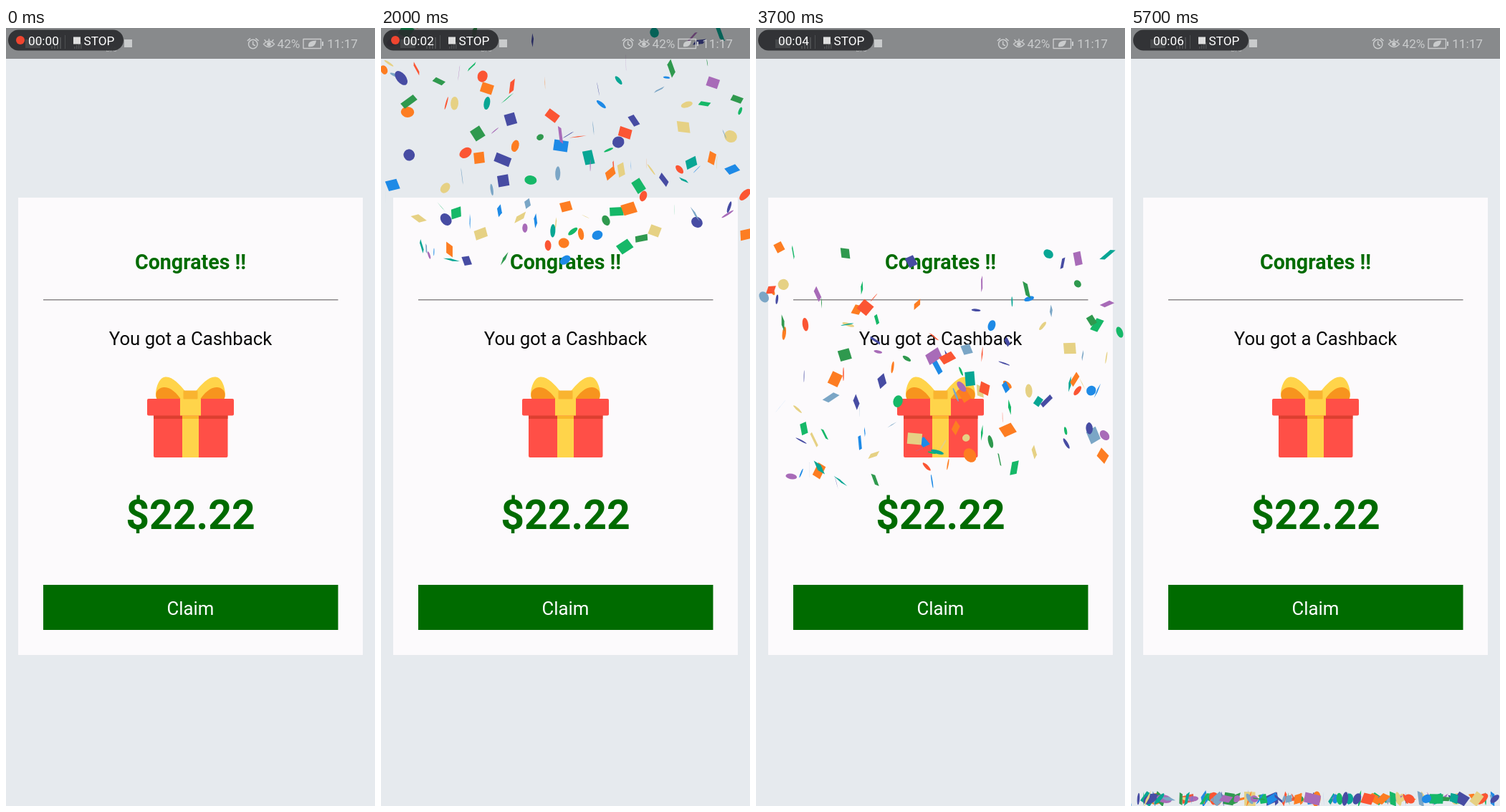
Animation of 515x1087 px, one loop 5.8 s. Source, as an HTML page with a canvas:

```html
<!DOCTYPE html>
<html lang="en">
<head>
<meta charset="utf-8">
<title>Cashback</title>
<style>
  html, body { margin: 0; width: 100%; height: 100%; overflow: hidden; background: #e6eaee; }
  canvas { display: block; width: 515px; height: 1087px; }
</style>
</head>
<body>
<canvas id="stage" width="515" height="1087"></canvas>
<script>
const ctx = document.getElementById('stage').getContext('2d');
const W = 515, H = 1087, LOOP = 5800, STEP = 100;
const GREEN = '#006b00', FAINT = '#c9cbcc';
const BURST_START = 1.15, BURST_TIME = 0.43, FALL_START = BURST_START + BURST_TIME;
const FLOOR = 1077, ORIGIN_X = -10;
const COLORS = ['#fd7d22', '#16b868', '#1e8ae6', '#7ba6c6', '#e6d184',
                '#fb5533', '#2f994e', '#474ca3', '#a86bb8', '#08a694'];

// Large pieces at full spread: x, y, colour, round
const LANDMARKS = [
  [488, 149, 4, 1], [39, 175, 7, 1], [105, 256, 1, 0], [91, 265, 7, 1], [171, 211, 7, 0],
  [16, 217, 2, 0], [255, 298, 0, 1], [302, 287, 2, 1], [340, 303, 1, 0], [510, 286, 0, 0],
  [251, 162, 2, 0], [135, 145, 6, 0], [181, 125, 7, 0], [341, 144, 5, 0], [433, 186, 9, 0],
  [422, 136, 4, 0], [441, 269, 7, 1], [90, 221, 4, 1], [37, 115, 0, 1], [118, 172, 5, 1],
  [148, 82, 0, 0], [239, 120, 5, 0], [209, 210, 1, 1], [139, 285, 4, 0], [258, 247, 0, 0],
  [329, 254, 1, 0], [346, 250, 0, 0], [382, 281, 4, 0], [331, 157, 7, 1], [463, 74, 8, 0]
];

let seed = 20;
function random(min = 0, max = 1) {
  seed = (seed * 1664525 + 1013904223) % 4294967296;
  return min + (max - min) * seed / 4294967296;
}

function makePiece(x, y, color, round, tilt) {
  const spin = () => ({ phase: random(-tilt, tilt), rate: random(-18, 18) });
  return {
    x, y, round, color: COLORS[color],
    w: random(12, 23), h: random(9, 17), swing: random(-34, 34),
    rx: spin(), ry: spin(), rz: spin()
  };
}

const pieces = LANDMARKS.map(([x, y, color, round]) => {
  const piece = makePiece(x, y, color, round, 0.6);
  piece.w = random(15, 20);
  piece.h = random(13, 17);
  return piece;
});
for (let i = 0; i < 100; i++) {
  const x = 4 + 508 * (i * 0.618034 % 1);
  pieces.push(makePiece(x, random(-6, 326), i % 10, random() < 0.5, Math.PI));
}

function rect(x, y, w, h, color, radius = 0) {
  ctx.fillStyle = color;
  ctx.beginPath();
  ctx.roundRect(x, y, w, h, radius);
  ctx.fill();
}

function disc(x, y, r, color) {
  ctx.fillStyle = color;
  ctx.beginPath();
  ctx.arc(x, y, r, 0, Math.PI * 2);
  ctx.fill();
}

function text(str, x, y, size, color, { weight = 400, align = 'center' } = {}) {
  ctx.font = `${weight} ${size}px Roboto, sans-serif`;
  ctx.textAlign = align;
  ctx.fillStyle = color;
  ctx.fillText(str, x, y);
}

function shape(path, color) {
  ctx.fillStyle = color;
  ctx.fill(new Path2D(path));
}

function line(path, color, width) {
  ctx.strokeStyle = color;
  ctx.lineWidth = width;
  ctx.stroke(new Path2D(path));
}

function drawGift() {
  rect(206, 535, 103.5, 65, '#ff4f47', 2);
  rect(206, 541, 103.5, 5, '#dd3f30');
  rect(246, 541, 23, 59, '#ffd44a');
  rect(246, 541, 23, 5, '#f9b72c');
  for (const side of [1, -1]) {
    ctx.save();
    ctx.translate(257.5, 0);
    ctx.scale(side, 1);
    shape('M-48 516 C-50 503 -43 489 -37 488 C-27 485 -16 497 -7 508 L-7 518 L-47 518 Z', '#ffd44a');
    shape('M-47 518 C-51 508 -44 502 -36 502 C-27 502 -19 511 -14 518 Z', '#f7941e');
    ctx.restore();
  }
  rect(197, 518, 121, 23.5, '#ff4f47', 2);
  rect(243, 518, 29, 23.5, '#ffd44a');
  rect(247.5, 506.5, 20, 12, '#f9b430', 1);
}

function drawCard() {
  rect(0, 0, W, H, '#e6eaee');
  rect(17, 237, 481, 639, '#fcfafc');
  text('Congrates !!', 257.5, 336.5, 28.6, GREEN, { weight: 700 });
  rect(52, 379, 411.5, 1.5, '#8b878a');
  text('You got a Cashback', 257.5, 442.5, 25.75, '#080808');
  drawGift();
  text('$22.22', 257.5, 699.5, 57.2, GREEN, { weight: 700 });
  rect(52, 778, 411.5, 63, GREEN);
  text('Claim', 257.5, 819.5, 25.75, '#fff');
}

function drawPiece(p, spread, drop, value) {
  const angle = ({ phase, rate }) => phase + rate * (value - 1);
  const a = angle(p.rx), b = angle(p.ry), c = angle(p.rz);
  const { sin, cos } = Math;
  const sway = value > 1 ? p.swing * sin(Math.PI * (value - 1) / 0.66) : 0;
  const x = ORIGIN_X + (p.x - ORIGIN_X) * spread + sway;
  const y = Math.min(FLOOR, FLOOR - (FLOOR - p.y) * spread + drop);
  ctx.save();
  // Flat projection of a turn about all three axes
  ctx.transform(
    cos(b) * cos(c), sin(c) * cos(a) + sin(b) * cos(c) * sin(a),
    -cos(b) * sin(c), cos(c) * cos(a) - sin(b) * sin(c) * sin(a), x, y);
  ctx.setTransform(ctx.getTransform());
  ctx.fillStyle = p.color;
  ctx.beginPath();
  if (p.round) ctx.ellipse(0, 0, p.w / 2, p.h / 2, 0, 0, Math.PI * 2);
  else ctx.rect(-p.w / 2, -p.h / 2, p.w, p.h);
  ctx.fill();
  ctx.restore();
}

function drawConfetti(t) {
  if (t < BURST_START) return;
  const u = Math.min(1, (t - BURST_START) / BURST_TIME);
  const spread = 1 - (1 - u) ** 2;
  const drop = Math.min(H, 32.7 * Math.max(0, t - FALL_START) ** 3);
  const value = spread + drop / H;
  for (const p of pieces) drawPiece(p, spread, drop, value);
}

function drawStatusIcons() {
  rect(165, 16, 11, 11, FAINT);
  text('B/s', 147, 32.5, 10, '#b5b7b8');
  ctx.lineCap = 'round';
  ctx.lineJoin = 'round';

  line('M338.5 22.5 a6.2 6.2 0 1 0 12.4 0 a6.2 6.2 0 1 0 -12.4 0 M344.7 19 V23 L347.5 24.5', FAINT, 1.5);
  line('M337.3 17.5 L340.5 14.8 M352.1 17.5 L348.9 14.8', FAINT, 1.6);

  line('M359.5 22.5 Q367 14.5 374.5 22.5 Q367 30.5 359.5 22.5 Z', FAINT, 1.5);
  line('M367 15.5 V17.5 M361 16.5 L362.5 18.5 M373 16.5 L371.5 18.5', FAINT, 1.4);
  disc(367, 22.5, 2.8, FAINT);

  text('42%', 378.5, 28, 17.2, FAINT, { align: 'left' });
  ctx.strokeStyle = FAINT;
  ctx.lineWidth = 1.4;
  ctx.strokeRect(415, 15.5, 24.5, 13);
  rect(441, 19, 2, 6, FAINT);
  shape('M422 26 C421 19 427 18 433 17.5 C432 24 429 27 422 26 Z', FAINT);
  text('11:17', 491, 28, 17.2, FAINT, { align: 'right' });
}

function drawStatusBar(t) {
  rect(0, 0, W, 43, 'rgba(0, 0, 0, 0.41)');
  drawStatusIcons();
  rect(3, 2.5, 161, 29, 'rgba(42, 43, 45, 0.9)', 14.5);
  rect(27, 16, 21, 12, '#47494b');
  for (let i = 0; i < 4; i++) {
    rect(63 + i * 4, 25 - i * 4, 2, 4 + i * 4, '#4c4e50');
    rect(95 + i * 3, 26 - i * 2, 1.5, 3 + i * 2, '#4c4e50');
  }
  rect(82, 10, 1, 19, '#4c4e50');

  const clock = t + 0.75;
  if (clock % 1 >= 0.5) disc(20, 17, 6, '#f0452f');
  const white = { align: 'left' };
  text('00:0' + Math.floor(clock), 31, 23.7, 17.2, '#fff', white);
  rect(94, 12.5, 10, 10, '#dedede');
  text('STOP', 108.5, 23.7, 17.2, '#fff', white);
}

function frame() {
  const t = Math.floor((performance.now() % LOOP) / STEP) * STEP / 1000;
  drawCard();
  drawConfetti(t);
  drawStatusBar(t);
  requestAnimationFrame(frame);
}
frame();
</script>
</body>
</html>
```
